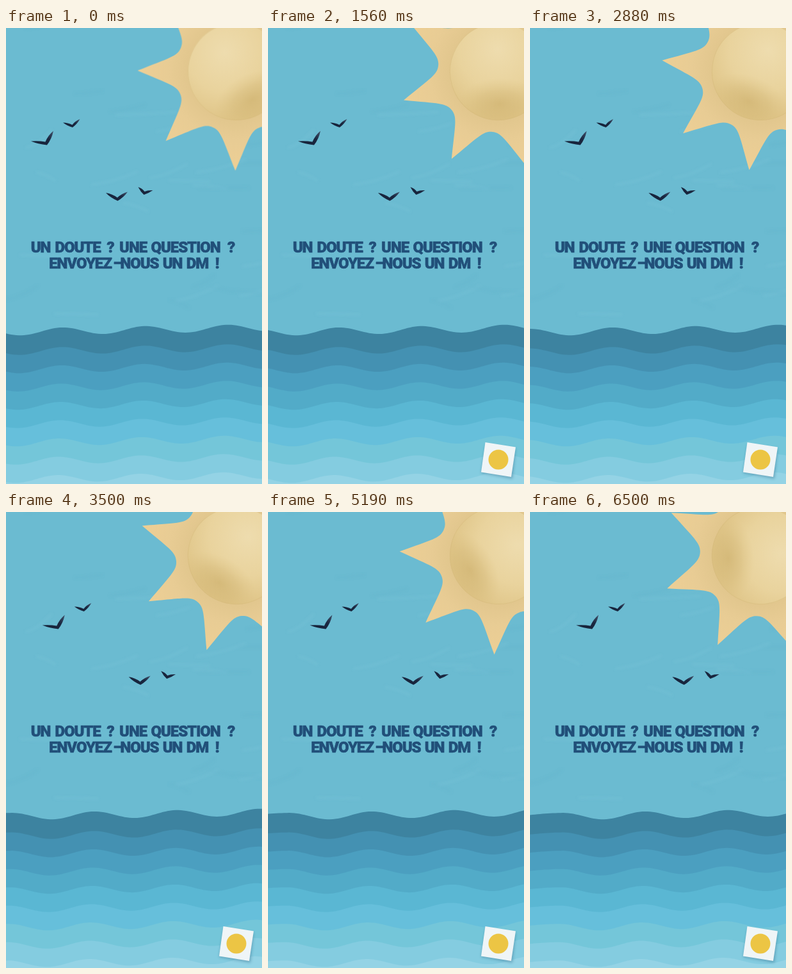
An HTML page that plays this animation: 400 px wide and 711 px high, repeating every 6560 ms.

```html
<!DOCTYPE html>
<html lang="fr">
<head>
<meta charset="utf-8">
<title>Un doute ? Une question ?</title>
<style>
  html, body { margin: 0; width: 100%; height: 100%; overflow: hidden; background: #6bbbd1; }
  svg { display: block; width: 100vw; height: 100vh; }
  text {
    font: 900 24px Roboto, "Open Sans", sans-serif;
    letter-spacing: -1.1px;
    text-anchor: middle;
    fill: #214f79;
    stroke: #214f79;
    stroke-width: .6px;
    stroke-linejoin: round;
  }
</style>
</head>
<body>
<svg viewBox="0 0 400 711" preserveAspectRatio="none">
  <defs>
    <radialGradient id="rays" gradientUnits="userSpaceOnUse" cx="0" cy="0" r="153">
      <stop offset=".48" stop-color="#e1c68d"/>
      <stop offset=".7" stop-color="#e8cc94"/>
      <stop offset="1" stop-color="#edcf95"/>
    </radialGradient>
    <radialGradient id="disc" gradientUnits="userSpaceOnUse" cx="-18" cy="-30" r="112">
      <stop offset="0" stop-color="#eedcae"/>
      <stop offset=".55" stop-color="#e9d39d"/>
      <stop offset="1" stop-color="#dec385"/>
    </radialGradient>
    <radialGradient id="shade" gradientUnits="userSpaceOnUse" cx="0" cy="0" r="50"
        gradientTransform="rotate(60) translate(50 0) scale(.8 1.3)">
      <stop offset="0" stop-color="#c9ab66" stop-opacity=".55"/>
      <stop offset=".5" stop-color="#cdb06c" stop-opacity=".33"/>
      <stop offset="1" stop-color="#d8bc7a" stop-opacity="0"/>
    </radialGradient>
    <linearGradient id="wing" x1="0" y1="1" x2="1" y2="0">
      <stop offset="0" stop-color="#152238"/>
      <stop offset=".6" stop-color="#1a2740"/>
      <stop offset="1" stop-color="#42546c"/>
    </linearGradient>
    <filter id="soft" x="-20%" y="-20%" width="140%" height="140%"><feGaussianBlur stdDeviation="2"/></filter>
  </defs>

  <rect width="400" height="711" fill="#6bbbd1"/>
  <g id="paper" fill="none" stroke-width="3" filter="url(#soft)"></g>

  <g id="sun">
    <path id="star" fill="url(#rays)"/>
    <circle r="76" fill="url(#disc)"/>
    <circle r="76" fill="url(#shade)"/>
    <circle r="75.5" fill="none" stroke="#d6ba7c" stroke-opacity=".5"/>
  </g>

  <g fill="url(#wing)">
    <g id="farBirds">
      <path d="M39 176.500Q51 175.500 61.500 177.500Q66 167 74 160.500Q71.500 173 64 182.500Q50 181 39 176.500Z"/>
      <path d="M89 147.500Q97 147.500 103.500 151Q108 145 115.500 142Q111 150 104 155Q95 152 89 147.500Z"/>
    </g>
    <g id="nearBirds">
      <path d="M156 257Q166 258.500 174 264.500Q181 258 190 255.500Q184 264 174.500 269.500Q163 264.500 156 257Z"/>
      <path d="M206.500 248Q213 250 216.500 255Q222 252.500 229.500 253Q224 257 215.500 260Q210 255 206.500 248Z"/>
    </g>
  </g>

  <g id="waves"></g>

  <text y="350"><tspan x="56.500">UN</tspan> <tspan x="114.500">DOUTE</tspan> <tspan x="165.500">?</tspan> <tspan x="201">UNE</tspan> <tspan x="283">QUESTION</tspan> <tspan x="351.500">?</tspan></text>
  <text y="374.500"><tspan x="116">ENVOYEZ</tspan><tspan x="174">–</tspan><tspan x="211">NOUS</tspan> <tspan x="262.500">UN</tspan> <tspan x="301.500">DM</tspan> <tspan x="329.500">!</tspan></text>

  <g id="card">
    <path d="M340 650L387 656L382 703L333 694Z" fill="#2c6685" opacity=".4" filter="url(#soft)"/>
    <path d="M339.500 646L387 653.500L380 700L333 692.500Z" fill="#eff5f7"/>
    <circle cx="360" cy="673" r="15.500" fill="#ecc544"/>
  </g>
</svg>

<script>
const LOOP = 6560, STEP = 62.5;
const BANDS = ['#3d83a0', '#4491b2', '#4b9fc0', '#52abc8', '#5ab7d3', '#66bfdb', '#74c6d9', '#84cce0', '#94d3e5'];
const $ = id => document.getElementById(id);

function add(parent, attrs) {
  const path = document.createElementNS('http://www.w3.org/2000/svg', 'path');
  for (const key in attrs) path.setAttribute(key, attrs[key]);
  parent.append(path);
}

// Eight tips with rounded valleys; each half-arm is one cubic.
function starPath() {
  const tip = [154.5, 0], arm = [[103.5, 21], [92.6, 23], [87.2, 36.1]];
  const spin = ([x, y], deg) => {
    const a = deg * Math.PI / 180, c = Math.cos(a), s = Math.sin(a);
    return `${(x * c - y * s).toFixed(2)} ${(x * s + y * c).toFixed(2)}`;
  };
  const flip = ([x, y]) => [x, -y];
  let d = 'M' + tip.join(' ');
  for (let k = 0; k < 8; k++) {
    const from = k * 45, to = from + 45;
    d += 'C' + arm.map(p => spin(p, from)).join(' ');
    d += 'C' + [flip(arm[1]), flip(arm[0]), tip].map(p => spin(p, to)).join(' ');
  }
  return d + 'Z';
}

// The swell has a steady wavelength, but its leftmost crest trails off slowly.
function wavePath(i) {
  const length = 129, crest = 88 - i;
  const top = 474 + (i && 2 + 28.5 * i);
  let d = 'M-120 760';
  for (let x = -120; x <= 404; x += 4) {
    const u = x - crest + length;
    const phase = (u < 0 ? u * .4 : u) / length * 2 * Math.PI;
    d += `L${x} ${(top - 0.0165 * x - 5.6 * Math.cos(phase)).toFixed(2)}`;
  }
  return d + 'V760Z';
}

// Faint creases in the paper sky.
function crumple() {
  let seed = 7;
  const rand = () => (seed = seed * 16807 % 2147483647) / 2147483647;
  for (let k = 0; k < 34; k++) {
    const x = rand() * 400, y = rand() * 460, len = 30 + rand() * 70, rise = (rand() - .65) * 50;
    add($('paper'), {
      d: `M${x} ${y}q${len / 2} ${rise * .2} ${len} ${rise}`,
      stroke: k % 2 ? '#8fd0e0' : '#58adc6',
      opacity: .18
    });
  }
}

const move = (id, x, y = 0) => $(id).setAttribute('transform', `translate(${x} ${y})`);

function draw(ms) {
  const n = Math.floor((ms % LOOP + 4) / STEP);
  $('sun').setAttribute('transform', `translate(360 68) rotate(${0.6 + 1.106 * n})`);
  move('farBirds', 0.318 * n);
  move('nearBirds', 0.637 * n);
  move('waves', 0.88 * n);

  const p = Math.min(1, Math.max(0, (n - 11) / 10));
  const left = (1 - p) ** 3;
  move('card', 0, 41 * left);
  $('card').setAttribute('opacity', Math.min(1, p * 2.2));
}

$('star').setAttribute('d', starPath());
BANDS.forEach((fill, i) => add($('waves'), { d: wavePath(i), fill }));
crumple();

const start = performance.now();
function tick() {
  draw(performance.now() - start);
  requestAnimationFrame(tick);
}
tick();
</script>
</body>
</html>
```
